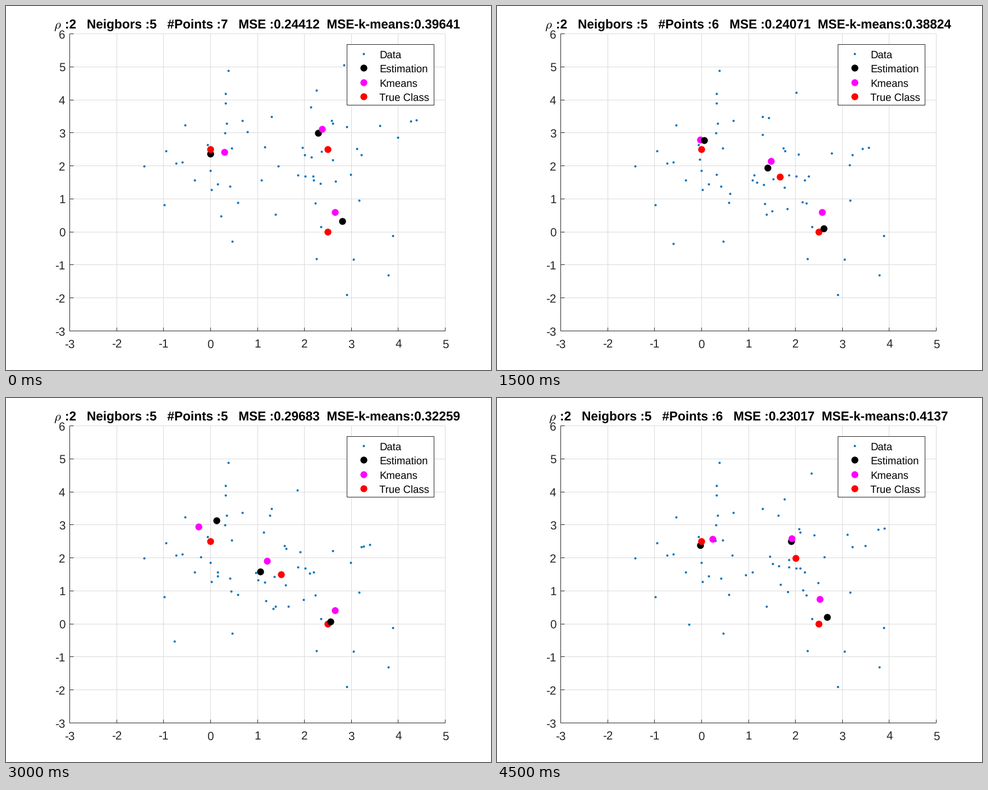
Recreate the animation shown at these times as a matplotlib script. Size 864 by 648 pixels, loop 5 s.

```python
import matplotlib.pyplot as plt
import numpy as np
from matplotlib.animation import FuncAnimation
from matplotlib.patches import Rectangle

W, H = 864, 648
INK, GRID, BLUE = "#262626", "#dadada", "#0072BD"
X0, X1, Y0, Y1 = 113, 782, 578, 49      # plot area in stage pixels
UX, UY = (X1 - X0) / 8, (Y1 - Y0) / 9   # pixels per data unit

plt.rcParams["font.family"] = "Liberation Sans"
plt.rcParams["mathtext.fontset"] = "cm"
plt.rcParams["text.hinting"] = "none"

# The travelling class mean, and the errors reported at each of its stops
MEANS = [2.5, 2.0, 1.85, 5 / 3, 1.5, 1.25]
MSE = [0.24412, 0.23017, 0.18457, 0.24071, 0.29683, 0.24393]
KMEANS_MSE = [0.39641, 0.4137, 0.45385, 0.38824, 0.32259, 0.3974]

# Key places of the centres for four values of the mean, as (xs, ys):
# upper left, travelling and lower right class
KEY_MEANS = [1.25, 1.5, 1.85, 2.5]
ESTIMATES = [((.18, .13, -.03, -.01), (3.03, 3.13, 2.40, 2.36)),
             ((.83, 1.06, 1.79, 2.29), (1.27, 1.58, 2.35, 2.99)),
             ((2.59, 2.56, 2.64, 2.81), (.11, .07, .16, .33))]
KMEANS = [((.25, -.26, .22, .29), (3.09, 2.95, 2.62, 2.42)),
          ((.80, 1.20, 1.78, 2.37), (1.58, 1.90, 2.43, 3.11)),
          ((2.65, 2.65, 2.48, 2.65), (.20, .41, .79, .60))]

rng = np.random.default_rng(7)


def px(x, y):
    return X0 + (x + 3) * UX, Y0 + (y + 3) * UY


def cloud(n, centre, spread):
    """Gaussian samples with exactly this mean and spread."""
    z = rng.normal(size=(n, 2))
    return (z - z.mean(0)) / z.std(0) * spread + centre


upper_left = cloud(20, (-.06, 2.48), (.62, 1.05))
lower_right = cloud(16, (2.29, .56), (.99, 1.38))
travelling = cloud(24, (-.02, .19), (.98, .97))     # relative to its mean

fig = plt.figure(figsize=(W / 72, H / 72), dpi=72, facecolor="white")
ax = fig.add_axes([0, 0, 1, 1])
ax.set_xlim(-.5, W - .5)
ax.set_ylim(H - .5, -.5)
ax.axis("off")


def line(xs, ys, color, z):
    ax.plot(np.round(xs), np.round(ys), color=color, lw=1, zorder=z,
            solid_capstyle="butt", snap=False)


def dots(color, size, z, x=(), y=()):
    return ax.scatter(x, y, s=size ** 2, color=color, lw=0, zorder=z)


def label(x, y, text, size, align, **kw):
    return ax.text(x, y, text, fontsize=size, ha=align, va="baseline", **kw)


# Grid, axes and tick labels
for v in range(-3, 6):
    x = px(v, 0)[0]
    line([x, x], [Y1, Y0], GRID, 0)
    line([x, x], [Y0 - 6.5, Y0], INK, 1)
    label(x, 608, str(v), 20.57, "center", color=INK)
for v in range(-3, 7):
    y = px(0, v)[1]
    line([X0, X1], [y, y], GRID, 0)
    line([X0, X0 + 6.5], [y, y], INK, 1)
    label(105, y + 8, str(v), 20.57, "right", color=INK)
line([X0, X0], [Y1, Y0], INK, 1)
line([X0, X1], [Y0, Y0], INK, 1)

# Legend
ax.add_patch(Rectangle((607, 68), 155, 108, fc="white", ec=INK, lw=1,
                       zorder=8, snap=False))
KEYS = [("Data", BLUE, 4), ("Estimation", "black", 12.3),
        ("Kmeans", "magenta", 12.3), ("True Class", "red", 12.3)]
for i, (name, color, size) in enumerate(KEYS):
    y = 84 + 25.5 * i
    dots(color, size, 9, [636], [y])
    label(664.5, y + 8, name, 18.51, "left", color="black", zorder=9)

rho = label(0, 40, r"$\rho$", 23, "center", color="black")
title = label(0, 40, "", 22.63, "left", color="black", weight="bold")

for group in (upper_left, lower_right):
    dots(BLUE, 4, 2, *px(*group.T))
moving = dots(BLUE, 4, 2)
# One marker per class, stacked: upper left, travelling, lower right
estimates = [dots("black", 12.3, z) for z in (5, 4, 4)]
kmeans = [dots("magenta", 12.3, z) for z in (4, 5, 5)]
truth = [dots("red", 12.3, z) for z in (6, 6, 3)]


def place(marks, centres):
    for mark, centre in zip(marks, centres):
        mark.set_offsets([px(*centre)])


def at(tracks, mean):
    return [[np.interp(mean, KEY_MEANS, c) for c in t] for t in tracks]


def draw(i):
    # The mean steps inwards for half the loop and back again
    k = min(i, 10 - i)
    mean = MEANS[k]
    moving.set_offsets(np.column_stack(px(*(travelling + mean).T)))
    place(estimates, at(ESTIMATES, mean))
    place(kmeans, at(KMEANS, mean))
    place(truth, [(0, 2.5), (mean, mean), (2.5, 0)])

    error = f"{KMEANS_MSE[k]:.5g}"
    title.set_text(f":2   Neigbors :5   #Points :{round(2.9 + 1.6 * mean)}   "
                   f"MSE :{MSE[k]:.5g}  MSE-k-means:{error}")
    left = 91 + 6.9 * (7 - len(error))   # the heading is centred
    rho.set_x(left)
    title.set_x(left + 13.5)
    return [moving, *estimates, *kmeans, *truth, title, rho]


anim = FuncAnimation(fig, draw, frames=10, interval=500, repeat=True,
                     repeat_delay=0, blit=False)
plt.show()
```
